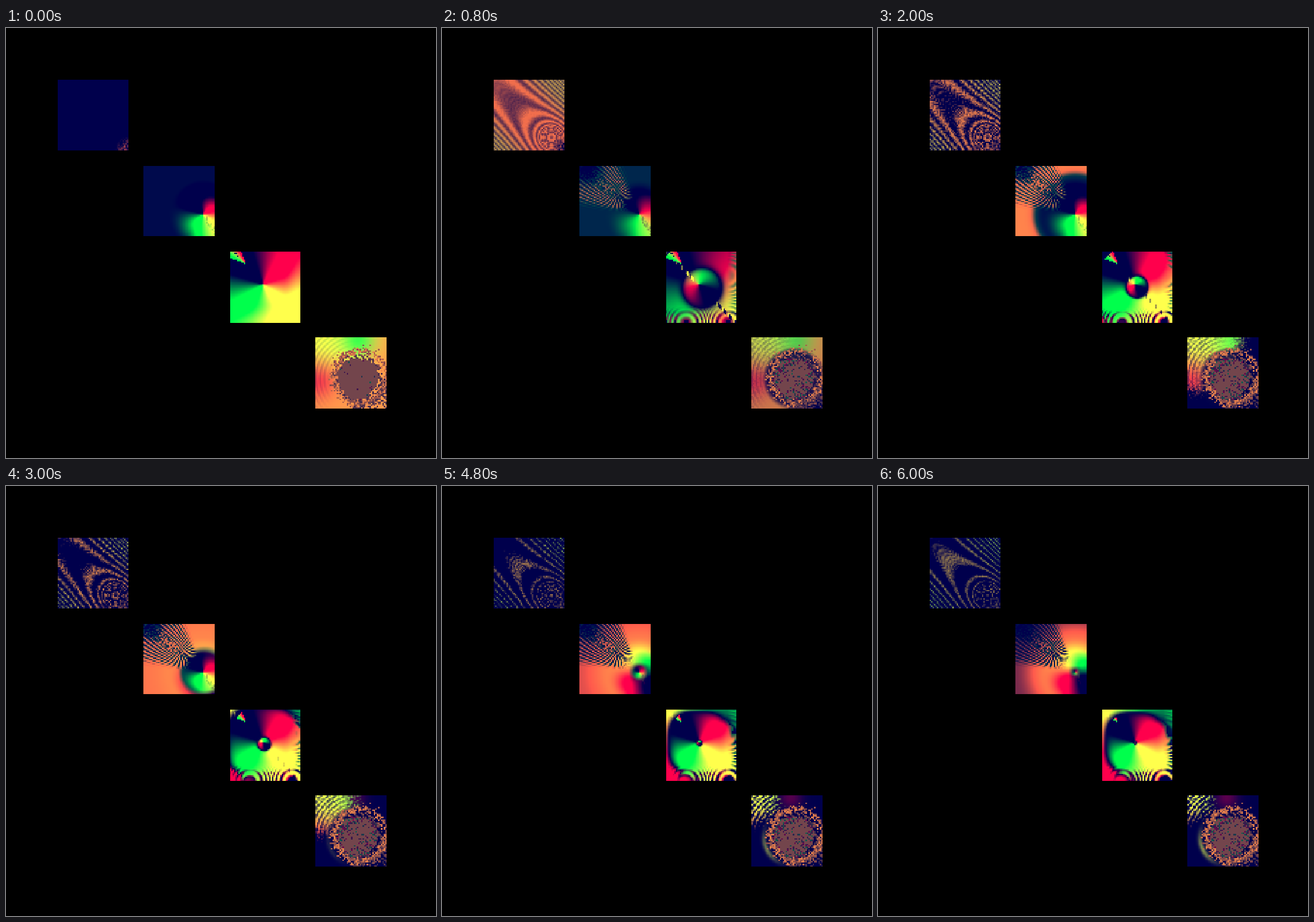
An HTML page with a canvas for the animation above (6200 ms loop, 748 px wide and 748 px high).

```html
<!DOCTYPE html>
<html lang="en">
<head>
<meta charset="utf-8">
<title>Phase tiles</title>
<style>
html, body { margin: 0; width: 100%; height: 100%; overflow: hidden; background: #000; }
canvas { display: block; width: 748px; height: 748px; }
</style>
</head>
<body>
<canvas id="stage" width="748" height="748"></canvas>
<script>
const ctx = document.getElementById('stage').getContext('2d');
const STEP = 200, COUNT = 31, CELLS = 50, TAU = Math.PI * 2;

const clamp = x => Math.max(0, Math.min(1, x));
const mix = (a, b, t) => a + (b - a) * t;
const ramp = (a, b, x) => { const t = clamp((x - a) / (b - a)); return t * t * (3 - 2 * t); };
const bell = (x, width) => Math.exp(-((x / width) ** 2));
const bump = (u, v, x, y, r) => bell(Math.hypot(u - x, v - y), r);
const wave = x => Math.cos(TAU * x);
const decay = (k, life) => Math.exp(-k / life);

function hash(x, y, seed) {
  let h = Math.imul(x + 11, 374761393) ^ Math.imul(y + 7, 668265263) ^ Math.imul(seed + 3, 1274126177);
  h = Math.imul(h ^ (h >>> 13), 1274126177);
  return ((h ^ (h >>> 16)) >>> 0) / 4294967296;
}

// Every tile opens plain, inverts once shortly after, then settles
const opened = k => Math.min(1, k / 2);
const flip = k => bell(k - 2, 1.6) * opened(k);

// Each painter returns red and green (0..1) of the cell u, v at step k

function arch(u, v, k, i, j) {
  const w = u - v + .05, d = Math.hypot(u - .82, v - .82);
  const mean = Math.max(-.35, .98 - .062 * k), amp = .2 + .027 * k;
  const shift = .5 * (1 - ramp(12, 30, k));
  const phase = .4 / (d + .01) + .04 / (d * d + .002) - 8 * Math.abs(w) ** 2.5;
  const grain = .45 * ramp(1, 12, k) * (1 - .3 * ramp(24, 30, k));
  let val = mean + amp * wave(phase - .6 - shift);
  val += grain * (wave(phase * 19) * .6 + (hash(i, j, 1) - .5) * 1.1);
  val *= opened(k);
  const pole = ramp(.2, .06, Math.hypot(u - 1, v - 1));
  val = clamp(mix(val, hash(i, j, 2) * .9 - .25, pole));
  const side = ramp(.3, .85, Math.abs(w));
  const red = val * (1 - .014 * k), green = red * (.4 + .014 * k);
  return [red * (1 - .25 * side), green * (1 + .3 * side)];
}

function fan(u, v, k, i, j) {
  const x = u - .84, y = v - .69, d = Math.hypot(x, y) + 1e-4;
  const far = ramp(.08, .5, d) * ramp(.95, .1, (x + y) / d * .707);
  const ex = mix(x / d, -1, far), ey = mix(y / d, -.2, far);
  let s = Math.tanh((2 * decay(k, 8) - d) / .08) * (1 - 2 * flip(k));

  // Striped lobes either side of a grainy line to the upper left
  let a = Math.atan2(y, x) + 2.45;
  if (a > Math.PI) a -= TAU;
  const span = Math.abs(a);
  const env = ramp(.62, .36, span) * ramp(.12, .38, d) * opened(k);
  const stripe = wave(a * 17 + d * 3 * Math.sign(a));
  const tex = mix(stripe, hash(i, j, 4) * 2 - 1, ramp(.15, .07, span));
  const late = (k / 30) ** 2;
  s = mix(s, s * .35 + .4 * late + 1.1 * k / (k + 4) * tex, env);
  s += 1.5 * opened(k) * bump(u, v, .1, .04, .17);
  if (x > .02 && Math.abs(x - y * .65) < .035) s *= mix(1, hash(i, j, 5), .6);

  const fade = 1 - .7 * late * ramp(.3, .85, d);
  return [(.3 + 1.3 * s * ex) * fade, (.3 + 1.3 * s * ey) * fade];
}

function wheel(u, v, k, i, j) {
  const x = u - .47, y = v - .465, d = Math.hypot(x, y) + 1e-4;
  const inner = k ? .42 * decay(k, 10) : 0, outer = .4 + .9 * decay(k, 7);
  const off = inner * .2 * (1 - flip(k));
  let s = 1;
  if (inner) s = Math.tanh((Math.hypot(x - off, y - off) - inner) / (inner * .2 + .01));
  s *= 1 - 2 * flip(k);
  const square = Math.cbrt(Math.abs(x) ** 3 + Math.abs(y) ** 3) - .25 * Math.max(0, x + y);
  s *= Math.tanh((outer - square) / .08);

  // Fringe arcs along the bottom and right edges
  const edge = clamp(ramp(.76, .95, v) + ramp(.86, 1, u) * .7);
  const cu = (u + .01) % .6 - .3;
  s -= 1.2 * ramp(1, 7, k) * edge * (.5 + .5 * wave(38 * (cu * cu + (v - 1) ** 2)));
  const bead = .8 * opened(k) * decay(k, 12);
  if (Math.abs(u - v) < .035 && (u > .62 || u < .4)) s -= bead * (.6 + wave(u * 13));

  const base = .4 * Math.min(1, Math.abs(s));
  let r = base + 1.35 * s * x / d, g = base + 1.35 * s * y / d;
  if (s > 0) {
    r += .5 * ramp(.72, 1, v);
    g += .4 * ramp(.75, 1, u) - .6 * bump(u, v, .84, .97, .1);
  } else if (d > inner) {
    r *= 1 - .7 * ramp(.3, .9, u);
    g *= 1 - .6 * ramp(.4, .9, u);
  }

  // Narrow bright spike out of the upper left corner
  const along = (.41 - u - v) * .7071, across = (.05 - u + v) * .7071;
  const q = across / (along * .45);
  if (along > 0 && along < .28 * decay(k, 22) && Math.abs(q) < 1) {
    r = .7 - q * 1.1;
    g = .7 + q * 1.1;
    if (Math.abs(q) < .2 && hash(i, j, 6) < .3) r = g = 0;
  }
  return [r, g];
}

function ring(u, v, k, i, j) {
  const x = u - .595, y = v - .575, d = Math.hypot(x, y);
  const n = hash(i, j, 7), m = hash(i, j, 8), rough = opened(k);
  const reach = .3 + 1.5 * decay(k, 8);
  let r = 1 - .75 * bump(u, v, .6, .04, .22);
  let g = .6 + .45 * bump(u, v, .1, .03, .4) + .35 * bump(u, v, .6, 0, .35)
    - .4 * bump(u, v, .04, .6, .25);

  // The coloured ground withdraws to the upper left corner
  let see = ramp(-.13, .13, reach - Math.hypot(u, v) + (n - .5) * .12 * rough);
  see -= (.2 + .035 * k) * ramp(.32, .5, d) * ramp(.75, .25, u + v * .5)
    * (.5 + .5 * wave((d + (m - .5) * .02 * rough) * 17));
  see = clamp(see * (1 - flip(k))) * (1 - .85 * rough * ramp(.46, .36, d));
  r *= see;
  g *= see;
  r += (.4 * (1 - decay(k, 14)) + .3 * flip(k)) * bump(u, v, .55, .03, .16);
  const sweep = ramp(8, 30, k) * bell(d - .42, .035) * bump(u, v, .22, .75, .24);
  r += .5 * sweep;
  g += .55 * sweep;

  const wob = d + (n - .5) * .025 + .012 * Math.sin(3 * Math.atan2(y, x));
  const band = Math.hypot(u - .625, v - .555) + (n - .5) * .02;
  if (wob < .285) {
    r = .45;
    g = .27;
    const calm = clamp(bump(u, v, .68, .48, .13) + bump(u, v, .5, .68, .13));
    if (n < mix(.03, .42, rough) * (1 - calm) * (.65 + d * 2)) {
      r = .08 + .4 * m * m;
      g = .04 + .35 * (1 - m) ** 2;
    }
  } else if (m < .75 * (1 - .85 * flip(k)) * bell(band - .365, .05)) {
    r = .5 + .45 * n;
    g = .28 + .25 * n;
  } else if (m > .6 && (wob < .34 || u + v > 1.5)) {
    r = .2 + .3 * n;
    g = .14 + .15 * n;
  }
  return [r, g];
}

const tiles = [
  { paint: arch, x: 90, y: 90, w: 122.5, h: 122.5 },
  { paint: fan, x: 239, y: 239.5, w: 124, h: 122.5 },
  { paint: wheel, x: 389.5, y: 388.5, w: 122, h: 124.5 },
  { paint: ring, x: 538.2, y: 538.2, w: 124, h: 124 }
];

function drawTile(tile, k) {
  const px = i => Math.round(tile.x + tile.w * i / CELLS);
  const py = j => Math.round(tile.y + tile.h * j / CELLS);
  for (let j = 0; j < CELLS; j++) {
    for (let i = 0; i < CELLS; i++) {
      const [r, g] = tile.paint((i + .5) / CELLS, (j + .5) / CELLS, k, i, j);
      ctx.fillStyle = `rgb(${Math.round(clamp(r) * 255)},${Math.round(clamp(g) * 255)},76)`;
      ctx.fillRect(px(i), py(j), px(i + 1) - px(i), py(j + 1) - py(j));
    }
  }
}

let shown = -1;
function tick() {
  const k = Math.floor(performance.now() / STEP) % COUNT;
  if (k !== shown) {
    shown = k;
    ctx.fillStyle = '#000';
    ctx.fillRect(0, 0, 748, 748);
    tiles.forEach(tile => drawTile(tile, k));
  }
  requestAnimationFrame(tick);
}
tick();
</script>
</body>
</html>
```
